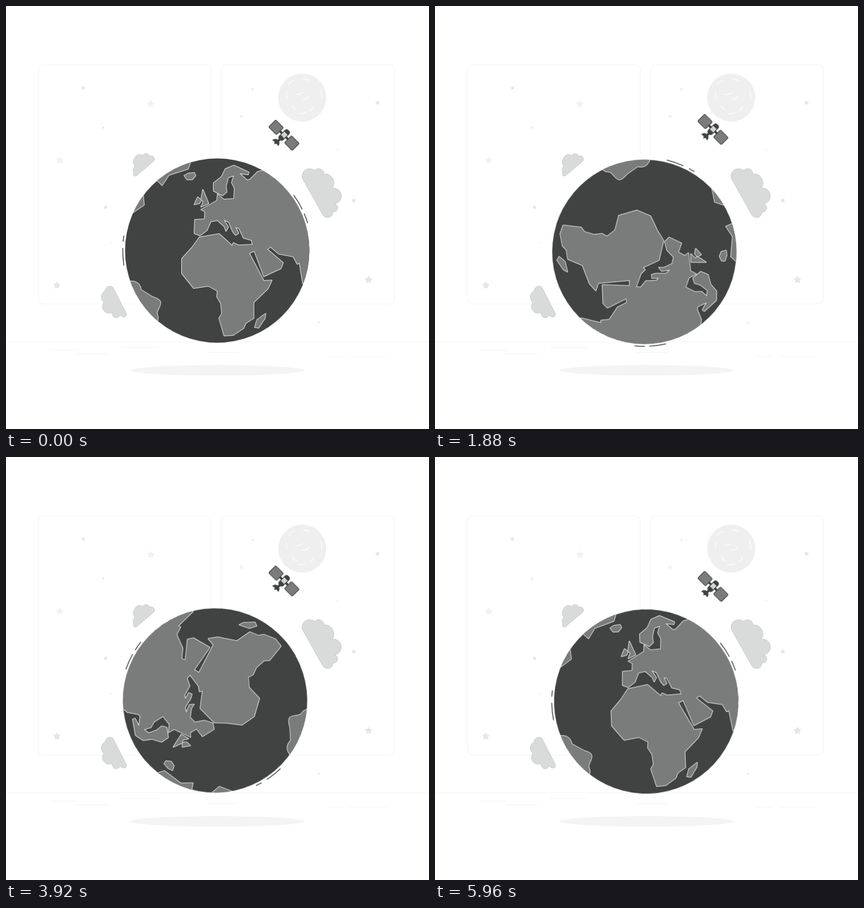
An HTML page for the animation above (6000 ms loop, 748 by 748 pixels).

```html
<!DOCTYPE html>
<html lang="en">
<head>
<meta charset="utf-8">
<title>Spinning globe</title>
<style>
  html, body { margin: 0; width: 100%; height: 100%; overflow: hidden; background: #fff; }
  svg { display: block; width: 100vw; height: 100vh; }
  .faint { fill: none; stroke: #f3f3f3; stroke-width: 1.2; }
  .star { fill: #e6e6e6; }
  .pale { fill: #f1f1f1; }
  .craters { fill: none; stroke: #fafafa; stroke-width: 1.8; stroke-linecap: round; }
  .cloud { fill: #d9dbda; stroke: #bcbfbd; stroke-width: .7; stroke-linejoin: round; }
  .sea { fill: #414342; }
  .coast { fill: none; stroke: #e9e9e9; stroke-width: 2; stroke-linejoin: round; }
  .land { fill: #7a7c7b; }
  .streaks { fill: none; stroke: #414342; stroke-width: 1.5; }
  .panel { fill: #7a7c7b; stroke: #414342; stroke-width: 1.3; }
  .spin { transform-origin: 371.1px 432.5px; animation: spin 6s linear infinite; }
  .float { animation: float 3s linear -50ms infinite; }
  @keyframes spin { to { transform: rotate(360deg); } }
  @keyframes float { 50% { transform: translateY(-15px); } }
</style>
</head>
<body>
<svg viewBox="0 0 748 748">
  <defs>
    <path id="star" d="M0-1 .33-.46.95-.31.53.17.59.81 0 .56-.59.81-.53.17-.95-.31-.33-.46Z"/>
    <rect id="panel" class="panel" x="10" y="-8.8" width="19.5" height="17.6" rx="1.8"/>
    <clipPath id="disc"><circle cx="373.5" cy="432.5" r="163"/></clipPath>
    <g id="lands">
      <!-- Scandinavia -->
      <path d="M454 291 445 293 431 307 426 308 413 296 428 298 429 294 403 282 388 288 381 302 367 313V327L383 335 390 329 389 318 393 303 403 300 399 312 404 322 403 341 460 345Z"/>
      <!-- Europe and Asia -->
      <path d="M570 291H454L403 341 385 342 374 333 373 344 345 360 352 364 351 377 334 378 333 402 343 406 355 397 362 381 374 379 386 390 389 398 393 391 385 378 394 382 401 399 406 405 411 402 406 391 412 393 420 410 434 414 439 433 456 478 486 464 490 454 462 430 468 426 482 438 508 443 515 456 519 454 525 490H570Z"/>
      <!-- Africa -->
      <path d="M435 422 411 423 402 419 400 424 377 403 342 409 329 427 311 447V473L332 499 358 495 374 504 373 514 380 526 382 544 377 552 386 583 402 582 420 570 424 561 438 552V524L463 500 470 485 456 486 430 437 439 433 450 425Z"/>
      <!-- Greenland, Iceland, Britain, Ireland, Madagascar -->
      <path d="M265 306 276 317 288 299 322 288 326 276 324 250Z"/>
      <path d="M315 300 322 296 333 295 335 300 329 307H320Z"/>
      <path d="M348 325 358 349 345 355 349 346 345 342Z"/>
      <path d="M339 338 345 343 342 349 333 351Z"/>
      <path d="M459 544 458 552 447 569 440 568 444 555Z"/>
      <!-- the Americas -->
      <path d="M242 330 244 352 225 365 200 370Z"/>
      <path d="M212 487H222Q236 487 239 502L257 513C263 517 270 517 273 523 275 529 268 536 267 543L269 551 266 570H200Z"/>
    </g>
  </defs>

  <g class="faint">
    <rect x="57.5" y="104" width="305.5" height="423" rx="9"/>
    <rect x="380.8" y="104" width="305.8" height="423" rx="9"/>
    <path d="M0 594H748M80 608.5H126M124 615.2H181M204 603.8H270M356 612.5H411M568 619.5H595M608 619.5H672"/>
  </g>
  <ellipse cx="374" cy="644.3" rx="154" ry="9.3" fill="#f4f4f4"/>

  <g id="stars"></g>

  <circle cx="523.8" cy="162" r="42.6" fill="#efefef"/>
  <path class="craters" d="M500 139Q503 133 509 131M526 129Q533 129 537 132M497 151Q495 157 497 163M512 156Q519 158 524 153M525 165Q533 165 536 158M507 177Q509 182 514 184M518 190Q525 192 530 188M538 185Q543 182 544 177M556 149Q560 156 558 164"/>

  <g class="cloud">
    <path d="M231 300 260 275.5A5.5 5.5 0 0 0 261 267 6 6 0 0 0 254 265.500 6.500 6.500 0 0 0 242 264.500 9 9 0 0 0 228 268 12 12 0 0 0 228 284 7 7 0 0 0 226 294Q224 300 228 301Z"/>
    <path d="M524 305 560 369Q562 374 570 374A9 9 0 0 0 578 364 7 7 0 0 0 581 350 13 13 0 0 0 577 322 16 16 0 0 0 562 297 9 9 0 0 0 546 291 14 14 0 0 0 526 293Q522 299 524 305Z"/>
    <path d="M190 499 213 544Q214 550 208 550 204 550 202 546A7 7 0 0 1 188 542 12 12 0 0 1 173 524 12 12 0 0 1 175 504C176 495 187 493 190 499Z"/>
  </g>

  <g class="float">
    <g transform="translate(491.5 229) rotate(45)">
      <path d="M-12 0H12" stroke="#414342" stroke-width="4"/>
      <use href="#panel"/>
      <use href="#panel" transform="scale(-1 1)"/>
      <rect class="sea" x="-5.5" y="-12" width="11" height="23" rx="4.5"/>
      <rect x="-4" y="-5" width="8" height="8.5" fill="#d2d4d3"/>
      <path class="sea" d="M-2 10H2V14H-2ZM-8.5 20.8A7.5 7.5 0 0 1 6.5 20.8L1 20 0 22.5H-2L-3 20Z"/>
    </g>
  </g>

  <g class="spin">
    <circle class="sea" cx="373.5" cy="432.5" r="163"/>
    <g clip-path="url(#disc)">
      <use href="#lands" class="coast"/>
      <use href="#lands" class="land"/>
    </g>
    <path class="streaks" d="M508.7 334.3A167 167 0 0 1 523.8 359.5M527.2 366.9A167 167 0 0 1 533.4 383.9M208.5 406.1A167 167 0 0 0 207.1 417M206.5 428.1A167 167 0 0 0 208.5 459"/>
  </g>
</svg>
<script>
  // x, y, radius
  const bright = [[137,145,4], [172,215,2.5], [176,356,4], [90,494,7], [436,147,2.3], [657,171,4.5], [615,344,4.5], [641,484,7.3], [553,560,2.2]];
  const dim = [[256,173,7], [95,273,7], [186,419,2], [416,195,4], [586,254,2.2]];
  const draw = (list, cls) => list.map(([x, y, r]) =>
    `<use href="#star" class="${cls}" transform="translate(${x} ${y}) scale(${r})"/>`).join("");
  document.getElementById("stars").innerHTML = draw(bright, "star") + draw(dim, "pale");
</script>
</body>
</html>
```
